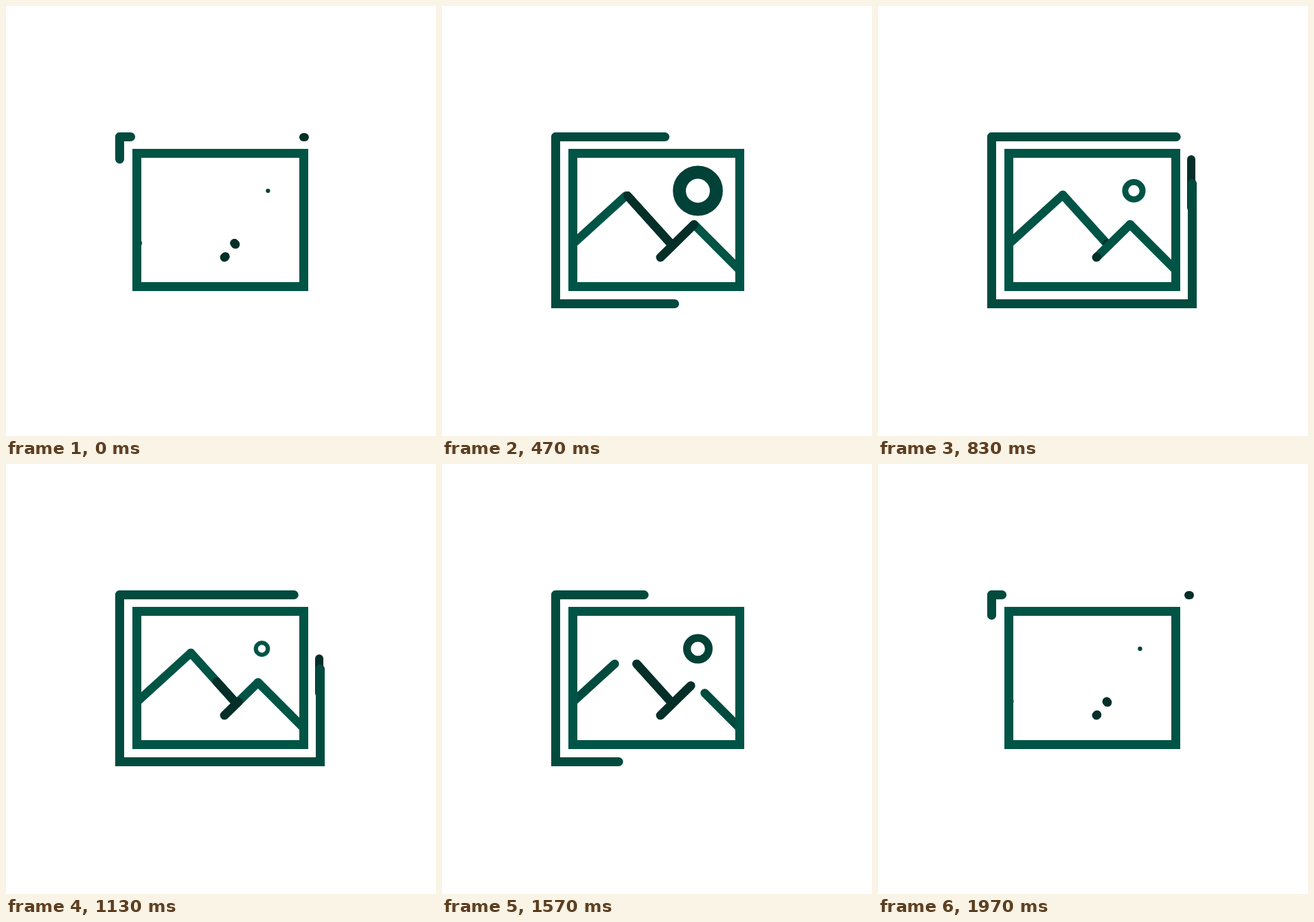
Recreate the animation shown at these times as an HTML page with a canvas. Size 626 by 626 pixels, loop 2 s.

```html
<!DOCTYPE html>
<html>
<head>
<meta charset="utf-8">
<style>
html, body { margin: 0; width: 100%; height: 100%; overflow: hidden; background: #fff; }
canvas { display: block; }
</style>
</head>
<body>
<canvas width="626" height="626"></canvas>
<script>
const g = document.querySelector('canvas').getContext('2d');
const LOOP = 2000, BAR = 13, HILL = 12.5;
const MAIN = '#005446', EDGE = '#014b3e', MID = '#024137', DARK = '#042f29';
const L = 165.5, T = 190.5, R = 457.5, B = 433.5;

const clamp = x => Math.max(0, Math.min(1, x));
const bump = (t, peak) => Math.exp(-(((t - peak) / 290) ** 2));

// Strokes the part of a polyline between two distances from its start
function trim(points, from, to, color, width) {
  g.beginPath();
  points.forEach(p => g.lineTo(...p));
  g.setLineDash([Math.max(to - from, 0.01), 9999]);
  g.lineDashOffset = -from;
  g.strokeStyle = color;
  g.lineWidth = width;
  g.stroke();
  g.setLineDash([]);
}

function slope(a, b, part, color, darkPart = 0) {
  const len = Math.hypot(b[0] - a[0], b[1] - a[1]);
  trim([a, b], 0, len * part, color, HILL);
  if (darkPart) trim([a, b], 0, len * Math.min(part, darkPart), DARK, HILL);
}

function drawBack(t, drawn) {
  const path = [[L, T], [L, B], [R, B], [R, T]];
  const tip = 770 * drawn, lead = (tip - 640) / 2;
  if (lead > 0) {
    const shifted = path.map(([x, y]) => [x - 1.5, y]);
    trim(shifted, tip - 35, tip + lead, DARK, BAR - 1);
  }
  trim(path, 0, tip, EDGE, BAR);
  trim([[L, T], [R, T]], 0, 4 + 287 * drawn, EDGE, BAR);

  // A dot runs in from the right to meet the top bar
  const age = (t + 50) % LOOP;
  if (age < 220) {
    const x = 453 - 1.12 * Math.max(0, age - 34);
    trim([[x - 1, 191], [x + 1, 191]], 0, 2, DARK, 12);
  }
}

function drawHills(grown, shade) {
  const color = grown < 0.9 ? EDGE : MAIN;
  g.save();
  g.beginPath();
  g.rect(190, 214, 243, 195);
  g.clip();
  slope([190, 347], [269, 275], grown, color);
  slope([437, 388], [367, 318], grown, color);
  slope([334, 347], [269, 275], grown, color, shade);
  slope([318, 366], [367, 318], clamp(grown * 1.16), color, shade);
  g.restore();
}

function drawSun(t, grown, shade) {
  const radius = 10.5 + 26 * bump(t, 490) + 11 * bump(t, 1570);
  g.beginPath();
  g.arc(372.5, 269, radius * 0.74, 0, clamp(1.5 * grown - 0.1) * 2 * Math.PI);
  g.lineWidth = radius * 0.52;
  g.strokeStyle = shade < 1 ? MAIN : MID;
  g.stroke();
}

const start = performance.now();

function frame() {
  const t = (performance.now() - start) % LOOP;
  const drawn = clamp(Math.min(0.041 + t / 943, (2010 - t) / 1010));
  const grown = clamp((drawn - 0.03) / 0.52);
  const shade = clamp(((t - 880) / 387) ** 2);

  g.fillStyle = '#fff';
  g.fillRect(0, 0, 626, 626);
  g.lineCap = 'round';
  drawBack(t, drawn);
  drawHills(grown, shade);
  drawSun(t, grown, shade);
  g.strokeStyle = MAIN;
  g.lineWidth = BAR;
  g.strokeRect(190.5, 214.5, 243, 194);
  requestAnimationFrame(frame);
}

frame();
</script>
</body>
</html>
```
